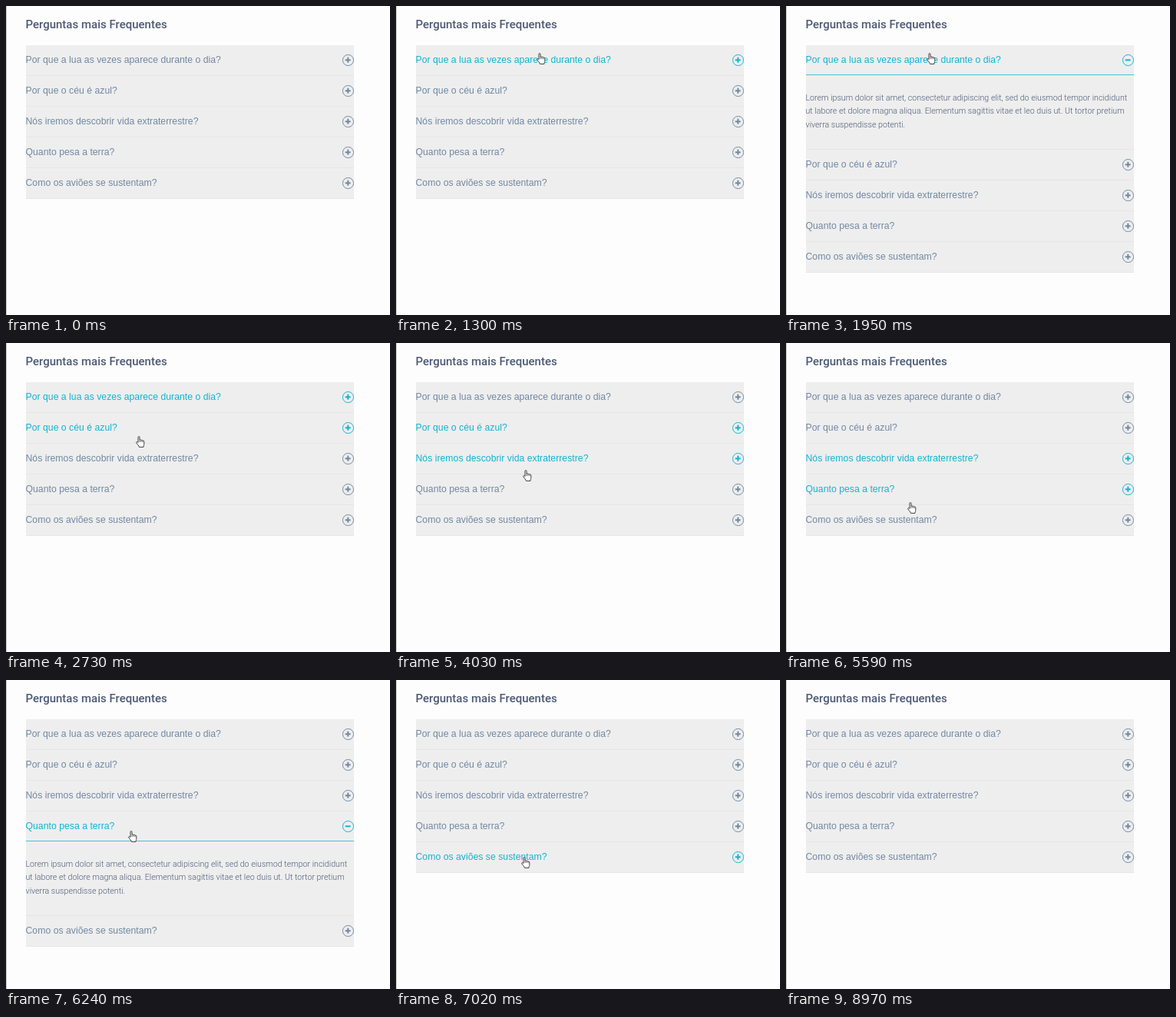
An HTML page that plays this animation: 500x402 px, repeating every 9230 ms.

```html
<!DOCTYPE html>
<html lang="pt">
<head>
<meta charset="utf-8">
<title>Perguntas mais Frequentes</title>
<style>
  html, body { margin: 0; width: 100%; height: 100%; overflow: hidden; background: #fdfdfd; }
  .stage { position: relative; width: 500px; height: 402px; overflow: hidden; box-sizing: border-box; border-left: 1px solid #c6c6c6; }
  h2 { position: absolute; left: 24.5px; top: 12px; margin: 0; font: 500 15px/24px Roboto, sans-serif; color: #4d5974; white-space: nowrap; }
  .list { position: absolute; left: 24.5px; top: 51px; width: 427px; }
  .item { background: #eee; border-bottom: 1px solid #e4e6e6; }
  .head { position: relative; height: 39px; font: 12.27px/39px "Liberation Sans", Arial, sans-serif; color: #7288a2; white-space: nowrap; }
  .head.lit { color: #14b4d1; }
  .head.open { box-shadow: inset 0 -0.67px #14b4d1; }
  .icon { position: absolute; right: 0; top: 12px; width: 14.67px; height: 14.67px; box-sizing: border-box; border: 1px solid; border-radius: 50%; }
  .icon::before, .icon::after { content: ""; position: absolute; left: 50%; top: 50%; background: currentColor; transform: translate(-50%, -50%); }
  .icon::before { width: 6.67px; height: 1.33px; }
  .icon::after { width: 1.33px; height: 6.67px; }
  .open .icon::after { width: 0; }
  .body { height: 0; overflow: hidden; opacity: 0; }
  .body p { margin: 21.33px 0; font: 300 10.67px/17.1px Roboto, sans-serif; color: #4d5974; }
  .hand { position: absolute; left: 0; top: 0; width: 12px; height: 16px; overflow: visible; }
</style>
</head>
<body>
<div class="stage">
  <h2>Perguntas mais Frequentes</h2>
  <div class="list"></div>
  <svg class="hand" viewBox="0 0 12 16" fill="#fff" stroke="#2a2a30" stroke-width=".9" stroke-linejoin="round">
    <path d="M3 8.5V1.6C3 .2 5 .2 5 1.6V5.4C5.3 4.6 7 4.7 7 5.8 7.5 5 9 5.3 9 6.4 9.6 5.7 10.8 6.1 10.8 7.2V10.5C10.8 12 10 12.5 10 14.4H4.5C4.2 12.6 1.6 10.6 .8 8.8 .3 7.6 1.7 7 3 8.5Z"/>
    <path d="M5 5.5V8M7 6V8M9 6.6V8.2" stroke-width=".7"/>
  </svg>
</div>
<script>
const LOOP = 9230, STEP = 130, FADE = 200, PANEL = 96, ROW = 40, TOP = 51;
const ANSWER = "Lorem ipsum dolor sit amet, consectetur adipiscing elit, sed do eiusmod tempor incididunt ut labore et dolore magna aliqua. Elementum sagittis vitae et leo duis ut. Ut tortor pretium viverra suspendisse potenti.";

// focus: pressed; open / close: panel starts to move; blur: focus lost
const rows = [
  { text: "Por que a lua as vezes aparece durante o dia?", focus: 1700, open: 1740, close: 2400, blur: 3020 },
  { text: "Por que o céu é azul?", focus: 3020, open: 3060, close: 3700, blur: 4440 },
  { text: "Nós iremos descobrir vida extraterrestre?", focus: 4440, open: 4480, close: 5000, blur: 6000 },
  { text: "Quanto pesa a terra?", focus: 6000, open: 6040, close: 6430, blur: 7000 },
  { text: "Como os aviões se sustentam?", focus: 7000, open: 7050, close: 7990, blur: 8970 }
];

// pointer tip: time, x, y
const path = [
  [130, 213, 349], [520, 205, 235], [1040, 190, 68], [1300, 187, 61], [2470, 187, 61],
  [2730, 173, 121], [2860, 173, 121], [2990, 172, 116], [3770, 172, 116], [4030, 169, 165],
  [4290, 168, 156], [5200, 168, 156], [5590, 162, 207], [5850, 163, 196], [6630, 163, 196],
  [7020, 167, 230], [8060, 167, 230], [8190, 172, 275], [8450, 190, 402]
];

const list = document.querySelector(".list");
const hand = document.querySelector(".hand");

function add(parent, cls, text = "", tag = "div") {
  const el = document.createElement(tag);
  el.className = cls;
  el.textContent = text;
  return parent.appendChild(el);
}

for (const row of rows) {
  const item = add(list, "item");
  row.head = add(item, "head", row.text);
  add(row.head, "icon", "", "span");
  row.body = add(item, "body");
  add(row.body, "", ANSWER, "p");
}

const clamp = v => Math.max(0, Math.min(1, v));

function pointerAt(t) {
  const i = path.findIndex(p => p[0] > t);
  if (i < 1) return null;
  const [t0, x0, y0] = path[i - 1], [t1, x1, y1] = path[i];
  const k = (t - t0) / (t1 - t0);
  return { x: x0 + (x1 - x0) * k, y: y0 + (y1 - y0) * k };
}

function draw(t) {
  const tip = pointerAt(t);
  hand.style.display = tip ? "" : "none";
  if (tip) hand.style.transform = `translate(${tip.x - 5}px, ${tip.y}px)`;

  let y = TOP;
  for (const row of rows) {
    const shown = clamp((t - row.open) / FADE) - clamp((t - row.close) / FADE);
    const hover = tip && tip.y >= y && tip.y < y + ROW;
    const focused = t >= row.focus && t < row.blur;
    row.head.classList.toggle("lit", Boolean(hover || focused));
    row.head.classList.toggle("open", t >= row.open && t < row.close);
    row.body.style.height = shown * PANEL + "px";
    row.body.style.opacity = shown;
    y += ROW + shown * PANEL;
  }
}

const start = performance.now();
function tick() {
  const t = (performance.now() - start) % LOOP;
  draw(Math.floor(t / STEP) * STEP);
  requestAnimationFrame(tick);
}
draw(0);
requestAnimationFrame(tick);
</script>
</body>
</html>
```
